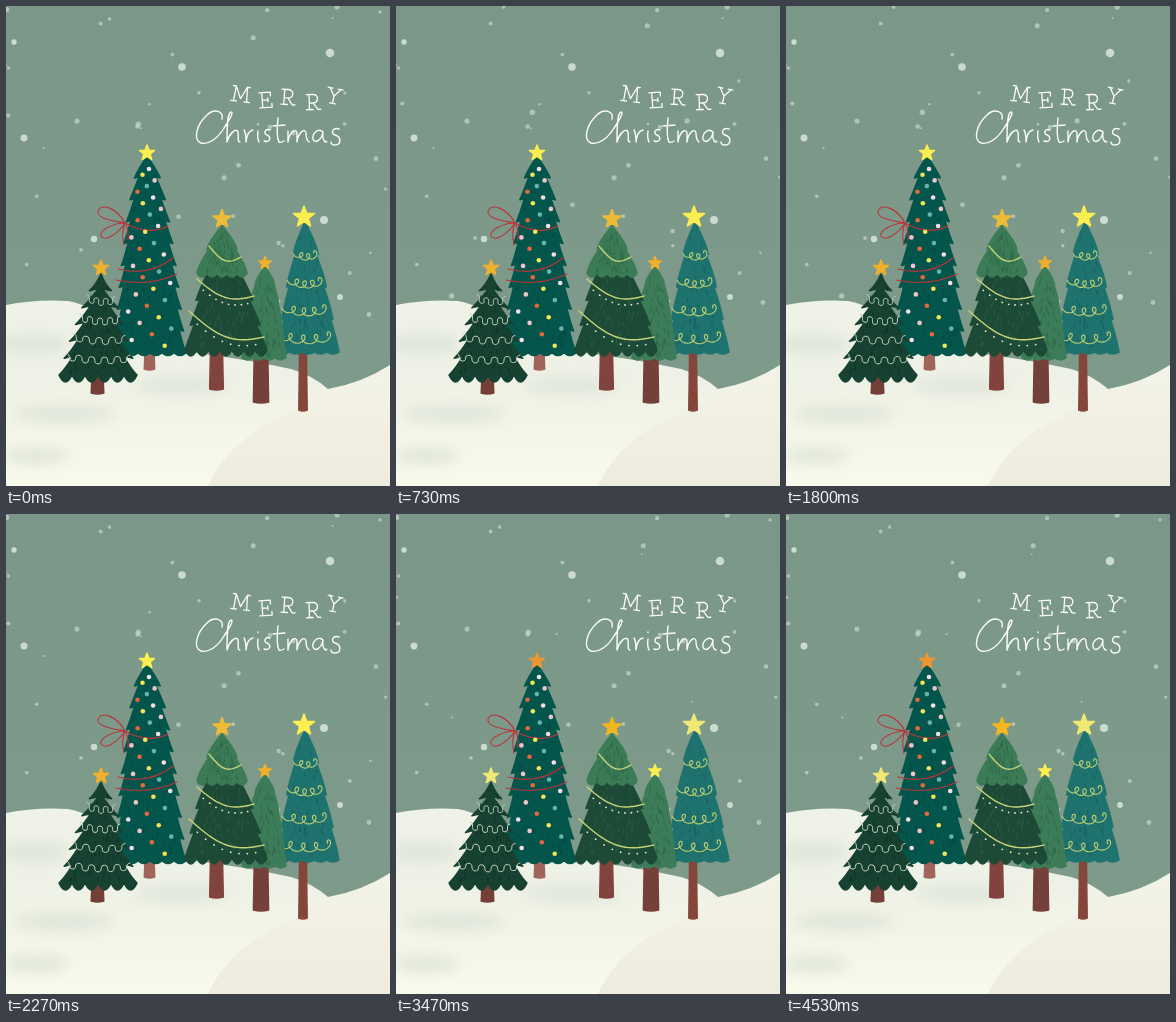
Write an HTML page that moves like this. It is 384 by 480 pixels and loops after 4.59 s.

```html
<!DOCTYPE html>
<html lang="en">
<head>
<meta charset="utf-8">
<title>Merry Christmas</title>
<style>
html, body { margin: 0; width: 100%; height: 100%; overflow: hidden; background: #7d9989; }
svg { display: block; width: 100vw; height: 100vh; }
</style>
</head>
<body>
<svg viewBox="0 0 384 480" role="img" aria-label="Merry Christmas" fill="none" stroke-linecap="round" stroke-linejoin="round">
  <defs>
    <linearGradient id="sky" x2="0" y2="1"><stop stop-color="#7b9787"/><stop offset="1" stop-color="#7f9b8b"/></linearGradient>
    <linearGradient id="hill" x2="0" y2="1"><stop stop-color="#eff2e6"/><stop offset=".4" stop-color="#eef1e5"/><stop offset="1" stop-color="#f8faec"/></linearGradient>
    <linearGradient id="front" x2="0" y2="1"><stop stop-color="#f3f3e7"/><stop offset="1" stop-color="#eeecde"/></linearGradient>
    <filter id="blur" x="-30%" y="-80%" width="160%" height="260%"><feGaussianBlur stdDeviation="7"/></filter>
  </defs>
  <rect width="384" height="480" fill="url(#sky)"/>
  <g id="snow" fill="#cbdbd0"></g>
  <path fill="url(#hill)" d="M0 299 Q30 293 62 295 Q90 300 112 325 Q150 341 182 346 Q240 353 285 363 Q306 369 322 383 L384 400 V480 H0Z"/>
  <g filter="url(#blur)" fill="#d9e0d4" opacity=".75">
    <ellipse cx="28" cy="338" rx="36" ry="9"/><ellipse cx="58" cy="408" rx="52" ry="8"/>
    <ellipse cx="176" cy="380" rx="48" ry="7"/><ellipse cx="30" cy="450" rx="34" ry="8"/>
  </g>
  <path fill="url(#front)" d="M202 480 Q217 446 253 423 Q289 404 322 383 Q356 377 384 359 V480Z"/>
  <g id="trees"></g>
  <g id="words" stroke="#fbfcf6" stroke-width="1.4"></g>
</svg>
<script>
const LOOP = 4590;
const [snow, trees, words] = ['snow', 'trees', 'words'].map(id => document.getElementById(id));

function add(parent, tag, attrs = {}) {
  const el = document.createElementNS('http://www.w3.org/2000/svg', tag);
  for (const k in attrs) el.setAttribute(k, attrs[k]);
  parent.append(el);
  return el;
}
const shape = (d, color) => add(trees, 'path', { d, fill: color, stroke: color, 'stroke-width': 1.5 });
const line = (d, color, w = 1) => add(trees, 'path', { d, stroke: color, 'stroke-width': w });
const dot = (parent, cx, cy, r, fill) => add(parent, 'circle', fill ? { cx, cy, r, fill } : { cx, cy, r });
const pt = (x, y) => `${x.toFixed(1)} ${y.toFixed(1)}`;
const lerp = (a, b, u) => a + (b - a) * u;

function random(seed) {
  return () => (seed = (seed * 16807) % 2147483647) / 2147483647;
}

// Smooth sample of a curve f(u) with u from 0 to 1.
function curve(f, n) {
  return 'M' + Array.from({ length: n + 1 }, (_, i) => pt(...f(i / n))).join('L');
}

const width = (t, u) => t.half * u ** t.power;
const middle = (t, u) => t.cx + t.lean * u;

// A tiered cone: each tier swells to a tip and steps back in by `notch`.
function conifer(t) {
  const right = [], left = [];
  for (let i = 1; i <= t.tiers; i++) {
    const u = i / t.tiers, y = lerp(t.top, t.base, u), h = width(t, u), c = middle(t, u);
    const up = (t.base - t.top) / t.tiers, inner = i < t.tiers ? t.notch : 0;
    const bend = h - t.notch * .7;
    right.push(`Q${pt(c + bend, y - up * .35)} ${pt(c + h, y)}L${pt(c + h - inner, y - inner * .25)}`);
    left.unshift(`${pt(c - h + inner, y - inner * .25)}L${pt(c - h, y)}Q${pt(c - bend, y - up * .35)} `);
  }
  const end = middle(t, 1) + t.half, step = 2 * t.half / t.frills;
  let hem = '';
  for (let i = 1; i <= t.frills; i++) {
    const x = end - i * step;
    hem += `Q${pt(x + step / 2, t.base + t.frill * 2)} ${pt(x, t.base)}`;
  }
  shape(`M${pt(t.cx, t.top)}${right.join('')}${hem}L${left.join('')}${pt(t.cx, t.top)}Z`, t.color);
  needles(t);
}

function needles(t) {
  const rnd = random(t.seed || 31);
  let d = '';
  for (let i = 0; i < 70; i++) {
    const u = .1 + .85 * Math.sqrt(rnd()), side = rnd() * 2 - 1;
    d += `M${pt(middle(t, u) + side * width(t, u) * .75, lerp(t.top, t.base, u))}l${side.toFixed(1)} 4`;
  }
  line(d, t.dark, .8);
}

function trunk(x, top, base, w, color) {
  shape(`M${x - w} ${top}H${x + w}L${x + w + .8} ${base - 1}Q${x} ${base + 1} ${x - w - .8} ${base - 1}Z`, color);
}

function tealTree() {
  const t = { cx: 299, lean: 3, top: 216, base: 346, half: 31, power: .65, tiers: 4, notch: 2.5, frills: 5, frill: 2, color: '#1f736f', dark: '#185f60' };
  trunk(297, 344, 405, 3.4, '#84453b');
  conifer(t);
  for (let i = 0; i < 4; i++) {
    const half = 10.5 + 5 * i, n = i ? 4 : 3, y = 247 + 27.5 * i, r = 3.2 + i * .4;
    line(curve(u => {
      const a = (u * n + .25) * 2 * Math.PI;
      return [300.5 + half * (2 * u - 1) - r * Math.sin(a), y + 4 * Math.sin(Math.PI * u) - r * Math.cos(a)];
    }, 90), '#bfcf72', 1.1);
  }
}

function slimTree() {
  trunk(255, 349, 397, 6.8, '#75403a');
  conifer({ cx: 259, lean: -1, top: 261, base: 352, half: 22, power: .5, tiers: 5, notch: .5, frills: 4, frill: 2, color: '#3d7c58', dark: '#2d6748', seed: 77 });
}

function tallTree() {
  const t = { cx: 141, lean: 3, top: 150, base: 347, half: 36, power: .47, tiers: 9, notch: 4.5, frills: 6, frill: 2.5, color: '#04554b', dark: '#054840', seed: 19 };
  trunk(143.5, 344, 364, 4.4, '#a1645a');
  conifer(t);

  const red = '#b9343a';
  line('M119 217Q142 230 162 220M112 263Q143 271 167 252M110 274Q143 281 171 268', red, 1.1);
  const tint = ['#f4dfe3', '#67b3ad', '#f3e45a', '#e5683f', '#f0c4cb'];
  for (let i = 0; i < 32; i++) {
    const u = (13 + i * 5.7) / 197, side = ((i + 1) * .618) % 1 * 2 - 1;
    dot(trees, middle(t, u) + side * width(t, u) * .76, lerp(t.top, t.base, u), 2.3, tint[i * 2 % 5]);
  }
  line('M119 217C111 202 96 197 92 205C90 213 109 215 119 217C108 217 93 224 95 230C100 237 114 225 119 217Q115 227 118 239M119 217Q123 223 122 234', red, 1.1);
}

function garlandTree() {
  const t = { cx: 216, lean: 4, top: 220, base: 344, half: 41, power: .72, tiers: 5, notch: 4, frills: 7, frill: 6, color: '#1d4a36', dark: '#276047', seed: 53 };
  trunk(210.5, 344, 384, 6, '#80433d');
  conifer(t);
  conifer({ ...t, lean: 0, base: 267, half: 25, power: .75, tiers: 2, notch: 2, frills: 5, frill: 4, color: '#3b7b55', dark: '#30694a' });
  const strings = [[203, 240, 235, 251, 9], [191, 273, 248, 290, 10], [183, 305, 258, 331, 13]];
  strings.forEach(([x0, y0, x1, y1, sag], k) => {
    const at = u => [lerp(x0, x1, u), lerp(y0, y1, u) + sag * Math.sin(Math.PI * u)];
    line(curve(at, 24), '#c7d57a', 1.4);
    for (let i = 1; k && i < 9; i++) {
      const [x, y] = at(i / 9);
      dot(trees, x, y + 6, .9, '#e8edcc');
    }
  });
}

function smallTree() {
  const t = { cx: 95, lean: -3, top: 268, base: 369, half: 39, power: .7, tiers: 6, notch: 9, frills: 6, frill: 7, color: '#174130', dark: '#0f3427', seed: 91 };
  trunk(91.5, 370, 388, 5.5, '#743f36');
  conifer(t);
  for (let i = 0; i < 4; i++) {
    const half = 14 + 6 * i, n = 3 + (i + 1 >> 1);
    line(curve(u => {
      const a = u * n * 2 * Math.PI;
      return [95 - i + half * (2 * u - 1) + .9 * Math.sin(2 * a), 292 + 19.5 * i + 2 * u + 3 * Math.sin(Math.PI * u) - 3.4 * Math.cos(a)];
    }, 80), '#c6d5c5');
  }
}

function lettering() {
  const R = 'M-7 -8H0C7 -8 6 1 0 1H-4M-4 -8V8M-7 8H0M0 1L5 8H8';
  const letters = [
    ['M-10 8h6M-7 8L-6 -8h-3M-6 -8L0 5L6 -8h3M6 -8L7 8M4 8h6', 235, 88, 7],
    ['M-7 -8H5V-4M-4 -8V8M-7 8H6V4M-4 0H2M2 -2V2', 260, 94, -4],
    [R, 282, 91, 4],
    [R, 307, 96, -2],
    ['M-8 -8h5M3 -8h5M-6 -8L0 0L6 -8M0 0V8M-3 8h6', 328, 90, 12]
  ];
  for (const [d, x, y, a] of letters)
    add(words, 'path', { d, transform: `translate(${x} ${y}) rotate(${a}) scale(.94)` });
  const script = [
    'M216 113C218 105 208 102 201 109C190 119 187 134 195 137C203 139 212 132 218 122C224 113 228 106 225 106C221 107 221 124 221 136C223 128 230 121 232 126C233 131 231 136 234 136',
    'M238 124Q240 127 240 136Q241 125 247 124',
    'M252 125Q251 132 253 136M252 118v.5',
    'M264 124C259 122 257 128 261 129C266 131 264 137 258 135',
    'M272 112Q270 130 273 136Q275 137 278 135M267 120L279 119',
    'M282 125V136C283 127 290 121 291 127V136C292 127 299 121 300 127Q300 134 303 136',
    'M317 126C312 121 306 128 307 133C309 139 316 133 317 126Q316 135 320 136',
    'M333 123C327 121 324 127 329 129C336 131 335 139 329 139Q325 139 325 136'
  ];
  for (const d of script) add(words, 'path', { d });
}

// Flakes scattered one per cell of a grid, away from even rows.
function scatter(seed, cols, rows, small, large) {
  const rnd = random(seed), g = add(snow, 'g', { opacity: .65 });
  for (let i = 0; i < cols * rows; i++)
    dot(g, (i % cols + rnd()) * 384 / cols, (Math.floor(i / cols) + rnd()) * 340 / rows, lerp(small, large, rnd()));
  return g;
}
const near = [[324, 47], [318, 214], [176, 61], [18, 132], [88, 233], [334, 291], [8, 36]];
near.forEach(([x, y], i) => dot(snow, x, y, 4.3 - i * .27));
scatter(4021, 5, 5, 1.4, 2.6);
const drift = scatter(905, 4, 4, 1.6, 2.8);
const tinyA = scatter(118, 3, 3, .9, 1.3);
const tinyB = scatter(667, 3, 3, .9, 1.3);

tealTree();
slimTree();
tallTree();
garlandTree();
smallTree();
lettering();

const YELLOW = '#fbee50', PALE = '#f0e872', ORANGE = '#ef9630', GOLD = '#f1b02b';

function star(x, y, r, on, off) {
  const points = Array.from({ length: 10 }, (_, i) => {
    const a = i * Math.PI / 5 - Math.PI / 2, q = i % 2 ? r * .42 : r;
    return pt(x + q * Math.cos(a), y + q * Math.sin(a));
  });
  return { el: shape('M' + points.join('L') + 'Z', on), on, off };
}
const stars = [
  star(141, 147, 8, YELLOW, ORANGE),
  star(95, 262, 8, GOLD, PALE),
  star(216, 213, 9.5, '#edbb36', '#f3b71f'),
  star(259, 257, 6.5, GOLD, YELLOW),
  star(298, 211, 11, YELLOW, PALE)
];

const show = (el, on) => el.setAttribute('visibility', on ? 'visible' : 'hidden');

function draw(t) {
  const lit = (t + 35) % (LOOP / 6) < LOOP / 12;
  const lifted = (t - 100 + LOOP) % (LOOP / 4) < 640;
  for (const s of stars) {
    s.el.setAttribute('fill', lit ? s.on : s.off);
    s.el.setAttribute('stroke', lit ? s.on : s.off);
  }
  show(tinyA, lit);
  show(tinyB, !lit);
  drift.setAttribute('transform', lifted ? 'translate(4 -12)' : '');
}

function tick() {
  draw(performance.now() % LOOP);
  requestAnimationFrame(tick);
}
tick();
</script>
</body>
</html>
```
